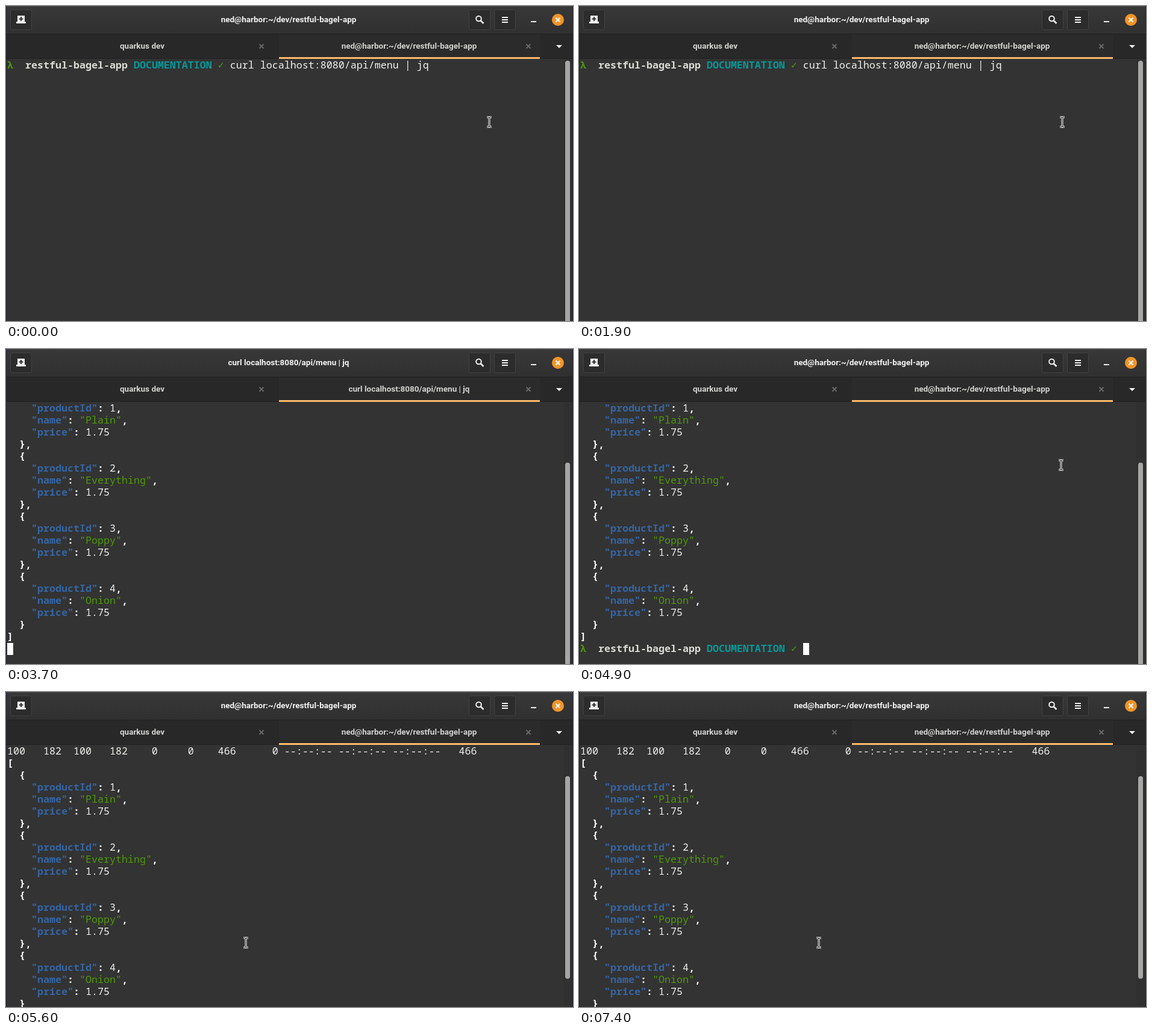
Animation, 941 px wide and 524 px high, one loop 8 s. Source, as an HTML page:

```html
<!DOCTYPE html>
<html lang="en">
<head>
<meta charset="utf-8">
<title>Terminal</title>
<style>
html, body { margin: 0; width: 100%; height: 100%; overflow: hidden; background: #333; }
#stage { position: relative; width: 941px; height: 524px; overflow: hidden; background: #333; }
#stage > * { position: absolute; }
svg { left: 0; top: 0; }
.label { font: bold 13.5px/20px Roboto, "Open Sans", sans-serif; color: #d2d2d0; text-align: center; white-space: pre; }
#title { left: 219px; top: 12px; width: 500px; color: #f4f4f4; }
#tab1 { left: 26px; top: 56px; width: 400px; }
#tab2 { left: 469px; top: 56px; width: 400px; }
#view { left: 0; top: 88px; width: 925px; height: 436px; overflow: hidden; }
#text { position: absolute; left: 2px; top: 0; color: #f0f0ee;
  font: 16.667px/20px "Noto Sans Mono", "DejaVu Sans Mono", monospace; font-variant-ligatures: none; }
#text div { height: 20px; white-space: pre; }
b { color: #fff; }
.name { color: #d8dbd4; }
.branch { color: #06989a; }
.key { color: #3465a4; }
.green { color: #4e9a06; }
#caret { position: absolute; width: 10px; height: 20px; background: #fff; }
#thumb { left: 928px; width: 8px; border-radius: 4px; background: #a6a6a4; }
</style>
</head>
<body>
<div id="stage">
  <svg width="941" height="524">
    <defs>
      <linearGradient id="bar" x2="0" y2="1"><stop stop-color="#383838"/><stop offset="1" stop-color="#303030"/></linearGradient>
    </defs>
    <rect width="941" height="46" fill="url(#bar)"/>
    <path d="M0 .5H941" stroke="#484848"/>
    <rect y="46" width="941" height="42" fill="#282828"/>
    <path d="M0 46.5H941M0 87.5H941" stroke="#212121"/>
    <rect x="453" y="47" width="433" height="38" fill="#2b2b2b"/>
    <rect x="453" y="85" width="433" height="3" fill="#fbb96c"/>
    <g fill="#2c2c2c" stroke="#434343">
      <rect x="7.5" y="6.5" width="35" height="33" rx="3"/>
      <rect x="768.5" y="6.5" width="35" height="33" rx="3"/>
      <rect x="810.5" y="6.5" width="35" height="33" rx="3"/>
    </g>
    <path d="M19 16h12v10h2v3H17v-3h2z" fill="#f2f2f2"/>
    <path d="M25 18v7M21.5 21.5h7" stroke="#2c2c2c" stroke-width="2"/>
    <g fill="none" stroke="#f2f2f2" stroke-width="2">
      <circle cx="784.5" cy="21" r="4.3"/>
      <path d="M787.5 24l5 5" stroke-width="2.6"/>
      <path d="M823 19h10M823 23h10M823 27h10M871 26h9"/>
    </g>
    <circle cx="916" cy="23" r="10" fill="#f19428"/>
    <path d="M912.5 19.5l7 7m0-7l-7 7" stroke="#fff" stroke-width="2"/>
    <path d="M420.5 63.5l7 7m0-7l-7 7M863.5 63.5l7 7m0-7l-7 7" stroke="#686868" stroke-width="2"/>
    <path d="M913 65h10l-5 5z" fill="#f2f2f2"/>
    <rect x="925" y="88" width="15" height="436" fill="#303030"/>
    <path d="M.5 0V524M940.5 0V524" stroke="#211c32"/>
  </svg>
  <div id="title" class="label"></div>
  <div id="tab1" class="label">quarkus dev</div>
  <div id="tab2" class="label"></div>
  <div id="view"><div id="text"></div><div id="caret"></div></div>
  <div id="thumb"></div>
  <svg id="pointer" width="20" height="24" fill="none">
    <path id="beam" d="M6 4h3l1 1 1-1h3M10 5v14M6 20h3l1-1 1 1h3" stroke="#fff" stroke-width="3"/>
    <path d="M6 4h3l1 1 1-1h3M10 5v14M6 20h3l1-1 1 1h3" stroke="#111"/>
  </svg>
</div>
<script>
const $ = id => document.getElementById(id);
const command = "curl localhost:8080/api/menu | jq";
const home = "ned@harbor:~/dev/restful-bagel-app";
const prompt = '<b class="green">λ</b>  <b class="name">restful-bagel-app</b> ' +
  '<b class="branch">DOCUMENTATION</b> <span class="green">✓</span> ';
const clocks = " --:--:-- --:--:-- --:--:--";

const head = [
  prompt + command,
  "  % Total    % Received % Xferd  Average Speed   Time    Time     Time  Current",
  " ".repeat(33) + "Dload  Upload   Total   Spent    Left  Speed",
];
const waiting = "  0     0    0     0    0     0      0      0" + clocks + "     0";
const done = "100   182  100   182    0     0    466      0" + clocks + "   466";

const bold = s => `<b>${s}</b>`;
const field = (key, value, comma) =>
  `    <b class="key">"${key}"</b>${bold(":")} ${value}${comma ? bold(",") : ""}`;
const json = ["Plain", "Everything", "Poppy", "Onion"].flatMap((name, i) => [
  bold("  {"),
  field("productId", i + 1, true),
  field("name", `<span class="green">"${name}"</span>`, true),
  field("price", "1.75", false),
  bold(i < 3 ? "  }," : "  }"),
]);
const output = [...head, done, bold("["), ...json, bold("]")];

function screenAt(t) {
  if (t < 3300) return { lines: head.slice(0, 1), row: 0, col: 70 };
  if (t < 3700) return { lines: [...head, waiting], row: 3, col: 78 };
  if (t < 3800) return { lines: output, row: 26, col: 0 };
  return { lines: [...output, prompt], row: 26, col: 37 };
}

const within = (t, a, b) => t >= a && t < b;

function caretOn(t) {
  return !(t < 100 || within(t, 700, 1300) || within(t, 1900, 2600) ||
    within(t, 3200, 3300) || within(t, 4400, 4900));
}

function scrollAt(t) {
  if (t < 3700) return 0;
  if (t < 5600) return 6;
  return within(t, 5700, 7400) ? 0 : 3;
}

function pointerAt(t) {
  if (t < 4900) return [802, 193];
  const k = Math.min(1, (t - 4900) / 500), e = k * k * (3 - 2 * k);
  return [Math.round(800 - 402 * e), Math.round(193 + 224 * e)];
}

let last = -1;
function draw(now) {
  const t = Math.floor(now % 8000 / 100) * 100;
  if (t !== last) {
    last = t;
    const { lines, row, col } = screenAt(t), scroll = scrollAt(t);
    const title = within(t, 3300, 3800) ? command : home;
    $("title").textContent = $("tab2").textContent = title;
    $("text").innerHTML = lines.map(l => `<div>${l}</div>`).join("");
    $("text").style.top = -20 * scroll + "px";
    $("caret").style.cssText =
      `left:${2 + 10 * col}px;top:${1 + 20 * (row - scroll)}px;opacity:${+caretOn(t)}`;
    $("thumb").style.top = 91 + scroll * 49 / 3 + "px";
    $("thumb").style.height = (t < 3700 ? 440 : 337) + "px";
    const [x, y] = pointerAt(t);
    $("pointer").style.cssText =
      `left:${x - 10}px;top:${y - 12}px;opacity:${+!within(t, 3300, 4900)}`;
  }
  requestAnimationFrame(draw);
}
draw(performance.now());
</script>
</body>
</html>
```
